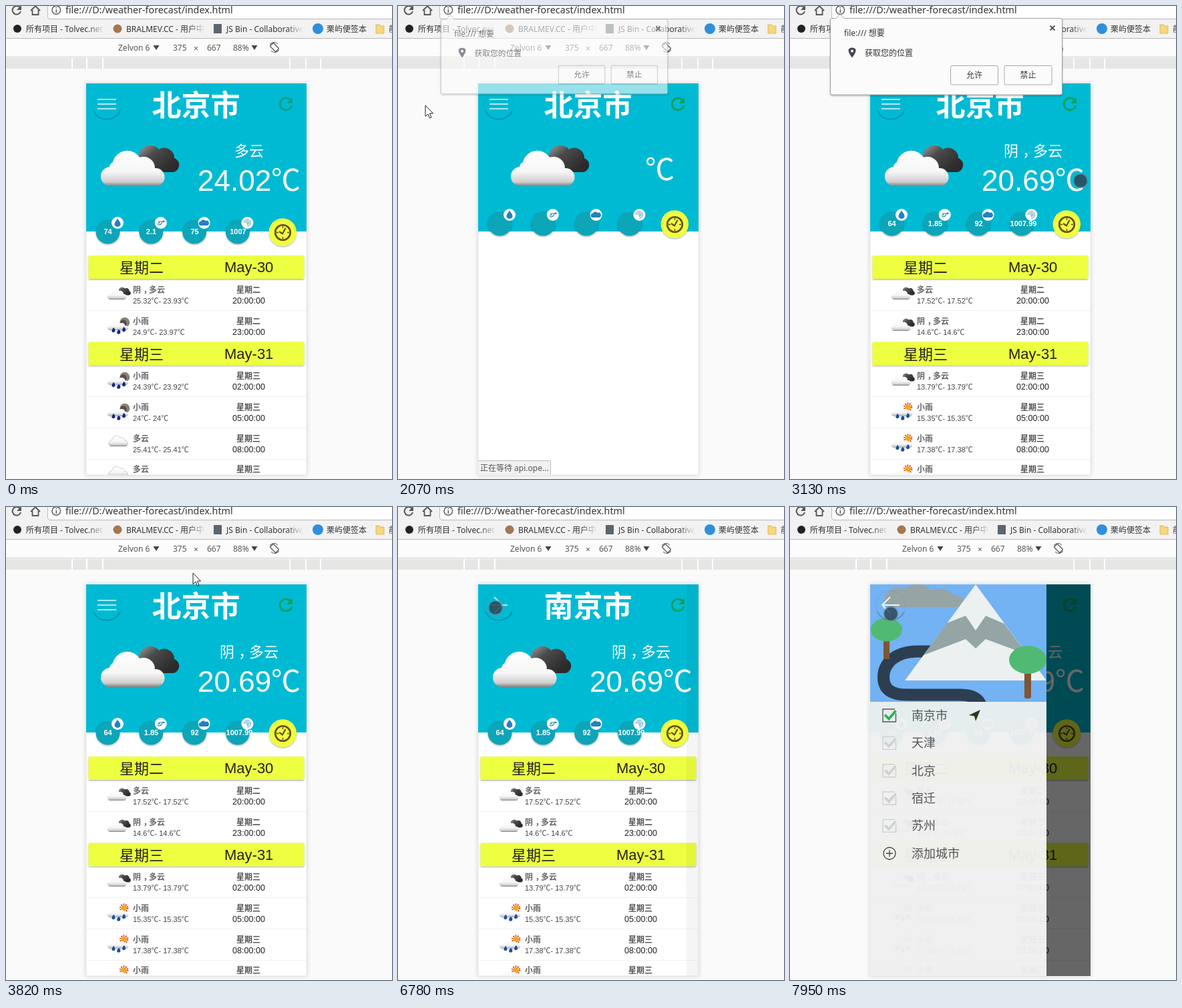
An HTML page that plays this animation: 578x709 px, repeating every 8000 ms.

```html
<!DOCTYPE html>
<html lang="zh-CN">
<head>
<meta charset="utf-8">
<title>Weather forecast</title>
<style>
html, body { margin: 0; width: 100%; height: 100%; overflow: hidden; background: #fafafa; }
svg { display: block; }
text { font-family: 'Noto Sans', 'Noto Sans CJK SC', 'Noto Sans CJK', sans-serif; white-space: pre; }
.cjk { font-family: 'Noto Sans CJK SC', 'Noto Sans CJK', sans-serif; }
.num { font-family: 'Liberation Sans', 'Noto Sans CJK SC', 'Noto Sans CJK', sans-serif; }
</style>
</head>
<body>
<svg id="stage" width="578" height="709" viewBox="0 0 578 709"></svg>
<script>
const LOOP = 8000;
const TEAL = '#00bad3', YELLOW = '#edff41';

const rect = (x, y, w, h, fill, more = '') =>
  `<rect x="${x}" y="${y}" width="${w}" height="${h}" fill="${fill}" ${more}/>`;
const disc = (x, y, r, fill, more = '') =>
  `<circle cx="${x}" cy="${y}" r="${r}" fill="${fill}" ${more}/>`;
const path = (d, fill, more = '') => `<path d="${d}" fill="${fill}" ${more}/>`;
const line = (d, color, width, more = '') =>
  `<path d="${d}" fill="none" stroke="${color}" stroke-width="${width}" ${more}/>`;
const text = (x, y, size, fill, str, cls = '', more = '') =>
  `<text x="${x}" y="${y}" font-size="${size}" fill="${fill}" class="${cls}" ${more}>${str}</text>`;
const group = (body, more = '') => `<g ${more}>${body}</g>`;
const MID = 'text-anchor="middle" ', BOLD = 'font-weight="700"';
const degrees = s => s.replace(/℃/g, '<tspan class="cjk">℃</tspan>');
// Sets the comma in the middle of its cell.
const comma = s => s.replace(/，(.)/, '<tspan dx=".28em">，</tspan><tspan dx="-.28em">$1</tspan>');

const defs = `<defs>
  <linearGradient id="white" gradientUnits="userSpaceOnUse" x1="0" y1="9" x2="0" y2="63">
    <stop offset="0" stop-color="#fff"/><stop offset=".6" stop-color="#f6f6f6"/>
    <stop offset=".88" stop-color="#cfcfcf"/><stop offset="1" stop-color="#808080"/>
  </linearGradient>
  <linearGradient id="dark" gradientUnits="userSpaceOnUse" x1="60" y1="0" x2="95" y2="42">
    <stop offset="0" stop-color="#999"/><stop offset=".4" stop-color="#4a4a4a"/>
    <stop offset="1" stop-color="#2b2b2b"/>
  </linearGradient>
  <linearGradient id="fade"><stop offset="0" stop-color="#f2f2f2" stop-opacity="0"/>
    <stop offset="1" stop-color="#f2f2f2"/></linearGradient>
  <filter id="low" x="-20%" y="-20%" width="140%" height="150%">
    <feDropShadow dx="0" dy="1.2" stdDeviation="1.3" flood-opacity=".34"/></filter>
  <filter id="soft" x="-10%" y="-10%" width="120%" height="120%">
    <feDropShadow dx="0" dy="0" stdDeviation="3" flood-opacity=".16"/></filter>
  <clipPath id="screen"><rect x="120" y="116" width="330" height="587"/></clipPath>
  <clipPath id="cover"><rect x="120" y="116" width="264" height="176"/></clipPath>
  <g id="cloud" fill="url(#white)">
    <path d="M15 63A14.500 14.500 0 0 1 12 34A9 9 0 0 1 17 27A22 22 0 0 1 57 20A17 17 0 0 1 80 36A13.500 13.500 0 0 1 82 63Z"/>
  </g>
  <g id="pair">
    <path d="M56 17A17 17 0 0 1 86 8A15 15 0 0 1 109 21A11 11 0 0 1 108 42H60Z" fill="url(#dark)"/>
    <use href="#cloud"/>
  </g>
  <g id="drops">${[[30, 48], [56, 57], [82, 45]].map(([x, y]) =>
    path(`M${x} ${y}q13 12 9 20a10 10 0 0 1 -19 0q-1 -7 10 -20z`, 'currentColor', 'stroke="#fff" stroke-width="2"')).join('')}</g>
  <g id="night">
    ${disc(86, 24, 25, '#8b8272')}${disc(79, 29, 17, '#55504a')}
    <use href="#cloud" transform="translate(0 12) scale(1.1 .8)"/><use href="#drops" color="#14248a"/>
  </g>
  <g id="sun">
    ${disc(82, 17, 18, 'none', 'stroke="#d9542c" stroke-width="9" stroke-dasharray="6 5.3"')}
    ${disc(82, 17, 14, '#f7a51c')}
    <use href="#cloud" transform="translate(0 12) scale(1.1 .8)"/><use href="#drops" color="#1a4c9c"/>
  </g>
</defs>`;

// Browser frame
const bookmark = (x, icon, label, end) =>
  icon + text(x, 39, 12, '#333', label) +
  (end ? rect(end - 24, 22, 24, 25, 'url(#fade)') + rect(end, 22, 12, 25, '#f2f2f2') : '');

const browser = rect(0, 0, 578, 709, '#fafafa') + rect(0, 0, 578, 48, '#f2f2f2') +
  path('M62.500 -2V16Q62.500 19.500 66 19.500H580V-2Z', '#fff', 'stroke="#b9b9b9"') +
  line('M21 2.500A6.300 6.300 0 1 0 22 8', '#555', 2) + path('M23 -1V6H16Z', '#555') +
  line('M37 7L44 0L51 7M39.500 6V13H48.500V6', '#555', 1.8) +
  line('M69 6a6.300 6.300 0 1 0 12.600 0a6.300 6.300 0 1 0 -12.600 0M75.300 5v5M75.300 2v1.600', '#555', 1.4) +
  text(89, 11, 14.3, '#333', 'file:///D:/weather-forecast/index.html') +
  bookmark(30, disc(17, 34, 6, '#222'), '所有项目 - Tolvec.net', 147) +
  bookmark(180, disc(167, 34, 6.5, '#a5764f'), 'BRALMEV.CC - 用户中心', 298) +
  bookmark(330, rect(311, 27, 12, 14, '#5a6670'), 'JS Bin - Collaborative', 445) +
  bookmark(480, disc(467, 34, 8, '#2e8fdc'), '栗屿便签本') +
  path('M554 28h5l2 2h5v11h-12z', '#f7d67c', 'stroke="#d9b04e" stroke-width=".8"') +
  text(573, 39, 12, '#333', '前') +
  rect(0, 48, 578, 1, '#b8b8b8') + rect(0, 49, 578, 27, '#fcfcfc') + rect(0, 76, 578, 1, '#cfcfcf') +
  text(168, 67, 12, '#555', 'Zelvon 6') + text(250, 67, 12, '#555', '375') +
  text(281, 68, 12, '#555', '×') + text(301, 67, 12, '#555', '667') + text(340, 67, 12, '#555', '88%') +
  path('M220.500 59h9l-4.500 7zM367.500 59h9l-4.500 7z', '#444') +
  group(rect(-3.5, -6, 7, 12, 'none', 'stroke="#555" stroke-width="1.300" rx="1"') +
    line('M-2 -7.500A7 7 0 0 1 7 0M2 7.500A7 7 0 0 1 -7 0', '#555', 1),
    'transform="translate(402 62) rotate(-45)"') +
  rect(0, 78, 578, 16, '#e6e6e4') +
  [98, 120, 144, 424, 448, 470].map(x => rect(x, 78, 2, 16, '#fff')).join('') +
  rect(120, 116, 330, 587, '#fff', 'filter="url(#soft)" stroke="#e4e4e4"');

// Weather page
const DAYS = ['二', '二', '三', '三', '三', '三'];
const HOURS = ['20', '23', '02', '05', '08', '11'];
const ROW_Y = [426, 473, 555, 602, 649, 695];
const ICON_POS = { pair: [152, -5], night: [152, -6], sun: [152, -6], cloud: [154, -8] };

const dayBar = (y, day, date) =>
  rect(123.5, y, 323, 35, YELLOW, 'rx="2" filter="url(#low)"') +
  text(170, y + 26, 22, '#222', day, 'cjk') + text(327, y + 25, 22, '#222', date, 'num');

const forecast = rows => dayBar(374, '星期二', 'May-30') + dayBar(503.5, '星期三', 'May-31') +
  [456, 585, 632, 679].map(y => rect(120, y, 330, 1, '#f0f0f0')).join('') +
  rows.map(([icon, desc, temps], i) => {
    const y = ROW_Y[i], [ix, iy] = ICON_POS[icon];
    return `<use href="#${icon}" transform="translate(${ix} ${y + iy}) scale(.3)" ${
        icon === 'cloud' ? 'stroke="#999" stroke-width="1.500"' : ''}/>` +
      text(190, y + 4, 12, '#666', comma(desc), 'cjk', BOLD) +
      text(190, y + 20, 11, '#444', degrees(temps), 'num') +
      text(363, y + 4, 12, '#555', '星期' + DAYS[i], 'cjk', MID + BOLD) +
      text(363.5, y + 20, 12.6, '#222', HOURS[i] + ':00:00', 'num', MID);
  }).join('');

const current = (desc, temp) =>
  `<use href="#pair" x="143" y="207"/>` +
  text(364, 225, 22, '#fff', comma(desc), 'cjk', MID + 'font-weight="500"') +
  text(287, 277, 44, '#fff', degrees(temp + '℃'), 'num');

const values = list => list.map((v, i) =>
  text(152.5 + i * 65 + (v.length > 5 ? 2 : 0), 342, 11, '#fff', v, 'num', MID + BOLD)).join('');

const before = {
  now: current('多云', '24.02'), vals: values(['74', '2.1', '75', '1007']),
  list: forecast([
    ['pair', '阴，多云', '25.32℃- 23.93℃'], ['night', '小雨', '24.9℃- 23.97℃'],
    ['night', '小雨', '24.39℃- 23.92℃'], ['night', '小雨', '24℃- 24℃'],
    ['cloud', '多云', '25.41℃- 25.41℃'], ['cloud', '多云', '25.41℃- 25.41℃']])
};
const after = {
  now: current('阴，多云', '20.69'), vals: values(['64', '1.85', '92', '1007.99']),
  list: forecast([
    ['pair', '多云', '17.52℃- 17.52℃'], ['pair', '阴，多云', '14.6℃- 14.6℃'],
    ['pair', '阴，多云', '13.79℃- 13.79℃'], ['sun', '小雨', '15.35℃- 15.35℃'],
    ['sun', '小雨', '17.38℃- 17.38℃'], ['sun', '小雨', '17.38℃- 17.38℃']])
};
const empty = `<use href="#pair" x="170" y="207"/>` + text(370, 261, 44, '#fff', '℃', 'cjk');

const BLUE = '#2580bd';
const badgeIcons = [
  path('M0 -6Q9 4 0 6Q-9 4 0 -6Z', BLUE),
  line('M-5 2.500Q0 4 1.500 0T5 -2.500T1 -2T-2 0M-5 0.500L-1 0', BLUE, 1.1),
  path('M-5 4A3 3 0 0 1 -5 -2A4 4 0 0 1 2 -3A3.600 3.600 0 0 1 5 4Z', BLUE),
  line('M-5 0A5 5 0 1 1 0 5M-2.500 0A2.500 2.500 0 1 1 0 2.500M0 -1V2', BLUE, 0.9)
];
const badges = badgeIcons.map((icon, i) => {
  const x = 152.5 + i * 64.8;
  return disc(x, 338.5, 18, '#08a5b8', 'filter="url(#low)"') +
    group(disc(0, 0, 9, '#fff') + icon, `transform="translate(${x + 14.5} 325)"`);
}).join('') +
  disc(414.3, 339, 20.8, YELLOW, 'filter="url(#low)"') +
  disc(414.5, 339.5, 11.3, 'none', 'stroke="#6a4a12" stroke-width="2.600"') +
  line('M414.500 330v3M414.500 346v3M405 339.500h3M421 339.500h3', '#6a4a12', 1.4) +
  line('M409 338L414 341.500L418.500 333', '#6a4a12', 2.2);

const layers = (key, extra = '') =>
  group(before[key], 'data-s="before"') + group(after[key], 'data-s="after"') + extra;

const page = group(
  rect(120, 116, 330, 222, TEAL) +
  text(284.5, 165, 44, '#fff', '北京市', 'cjk', `id="city" ${MID} ${BOLD}`) +
  group(line('M426 141A9 9 0 1 0 428 149', 'currentColor', 2.8) +
    path('M429 137V146H420Z', 'currentColor'), 'id="reload"') +
  layers('now', group(empty, 'data-s="empty"')) + layers('list') +
  group(badges + layers('vals'), 'id="badges"') +
  group(rect(119.5, 681.5, 109, 23, '#f1f1f1', 'stroke="#bdbdbd" rx="2"') +
    text(123, 697, 12, '#555', '正在等待 api.ope...'), 'id="status"') +
  rect(432, 116, 18, 587, '#000', 'id="strip" opacity="0"') +
  rect(120, 116, 330, 587, '#000', 'id="scrim" opacity="0"'),
  'clip-path="url(#screen)"');

// Side drawer
const cover = group(
  rect(120, 116, 264, 176, '#73b2f3') +
  path('M150 150A12 12 0 0 1 147 128A17 14 0 0 1 172 123A25 20 0 0 1 212 125A24 18 0 0 1 245 132A17 14 0 0 1 262 150Z', '#95a5a6') +
  line('M225 216.500H190C157 217 140 235 140 255C140 275 154 281.500 175 281.500H255C274 281.500 285 288 287 302', '#2c3e50', 18) +
  path('M278 116L384 260H172Z', '#ecf0f1') +
  path('M200 222L235 174L263 163L278 185L293 163L321 175L355 221L293 198L278 212L263 198Z', '#95a5a6') +
  rect(140, 198, 9, 30, '#7e5634') + `<ellipse cx="144.500" cy="184" rx="23.500" ry="17.500" fill="#51ba72"/>` +
  rect(351, 245, 10, 42, '#7e5634', 'rx="3"') + `<ellipse cx="356" cy="229" rx="28" ry="21" fill="#51ba72"/>`,
  'clip-path="url(#cover)"');

const cities = ['南京市', '天津', '北京', '宿迁', '苏州', '添加城市'];
const drawer = group(
  rect(120, 292, 264, 411, '#fff', 'opacity=".9"') + cover +
  cities.map((name, i) => {
    const y = 312.5 + i * 41.35;
    const label = text(182, y + 6.5, 18, '#555', name, 'cjk');
    if (i === 5) return label +
      disc(149, y, 9, 'none', 'stroke="#444" stroke-width="1.300"') +
      line(`M144 ${y}h10M149 ${y - 5}v10`, '#444', 1.3);
    const [box, tick] = i ? ['#ccd0d0', '#cdd2d2'] : ['#555', '#27b24a'];
    return label + line(`M157 ${y - 9.5}H139V${y + 9.5}H158.500V${y - 3}`, box, 1.4) +
      line(`M142 ${y - 1}l6 6l10.500 -12`, tick, 3.6);
  }).join('') + path('M285 304L278 321L276 313.500L268 312Z', '#33351f'),
  'id="drawer"');

const menu = group(
  disc(151, 148, 22, 'none', 'stroke="#000" stroke-opacity=".04" stroke-width="1.500"') +
  line('M131 157A22 22 0 0 0 171 157', '#000', 2, 'opacity=".15"') +
  `<path id="bars" fill="none" stroke="#fff" stroke-width="2"/>`);

// Permission prompt
const button = (x, label) =>
  rect(x, 89.5, 71, 28.5, '#fbfbfb', 'stroke="#a9a9a9" rx="2"') +
  text(x + 35.5, 108, 12, '#333', label, 'cjk', MID);
const prompt = group(
  path('M62.500 18.500H69L75 12.500L81 18.500H405Q407.500 18.500 407.500 21V130.500Q407.500 133 405 133H63Q60.500 133 60.500 130.500V21Q60.500 18.500 63 18.500Z',
    '#fbfbfb', 'stroke="#a5a5a5" filter="url(#low)"') +
  text(81, 45, 12, '#333', 'file:/// 想要') +
  line('M389.500 29.500l7 7m0 -7l-7 7', '#555', 2) +
  path('M93 77.500Q82 63 93 62.500Q104 63 93 77.500Z', '#4c4355') + disc(93, 67.5, 2, '#fff') +
  text(112, 75, 12, '#333', '获取您的位置', 'cjk') + button(240.5, '允许') + button(321, '禁止'),
  'id="prompt"');

const pointer =
  path('M0 0V16.500L4 13L6.500 19L9 18L6.500 12H11.500Z', '#fff', 'id="arrow" stroke="#222" stroke-linejoin="round"') +
  disc(0, 0, 10.5, '#2c4250', 'id="touch" stroke="#5f8aa0" stroke-width="1.500"');

const stage = document.getElementById('stage');
stage.innerHTML = defs + browser + page +
  group(drawer, 'clip-path="url(#screen)"') + menu + prompt + pointer;

const $ = id => document.getElementById(id);
const set = (id, name, value) => $(id).setAttribute(name, value);
const show = (node, on) => node.setAttribute('visibility', on ? 'visible' : 'hidden');
const span = (t, a, b) => Math.min(1, Math.max(0, (t - a) / (b - a)));

// time, x, y
const TRACK = [
  [0, 461, 714], [70, 461, 709], [500, 100, 273], [670, 100, 273], [980, 16, 12], [1500, 16, 12],
  [1990, 41, 149], [2650, 41, 149], [3060, 435, 262], [3130, 435, 262], [3400, 250, 104],
  [3520, 280, 99], [4590, 280, 99], [4830, 284, 153], [5150, 284, 153], [5420, 215, 132],
  [5690, 146, 151], [7949, 146, 151], [7950, 151, 160], [LOOP, 151, 160]
];
function pointerAt(t) {
  const i = Math.max(1, TRACK.findIndex(k => k[0] > t));
  const [a, b] = [TRACK[i - 1], TRACK[i]];
  const u = span(t, a[0], b[0]), e = u * u * (3 - 2 * u);
  return [a[1] + (b[1] - a[1]) * e, a[2] + (b[2] - a[2]) * e];
}

function draw(t) {
  const state = t < 1520 ? 'before' : t < 2290 ? 'empty' : 'after';
  stage.querySelectorAll('[data-s]').forEach(g => show(g, g.dataset.s === state));
  show($('status'), state === 'empty');
  $('city').textContent = t < 4660 ? '北京市' : '南京市';
  set('reload', 'color', state === 'before' ? '#0fa184' : '#10a05c');
  set('badges', 'transform', `translate(0 ${t >= 1520 && t < 3740 ? -12 : 0})`);

  const shown = t < 3000 ? span(t, 1940, 2190) : 1 - span(t, 3670, 3820);
  const scale = 0.955 + 0.045 * shown;
  show($('prompt'), shown > 0);
  set('prompt', 'opacity', Math.min(1, shown * 1.15));
  set('prompt', 'transform', `translate(234 75) scale(${scale}) translate(-234 -75)`);

  const open = span(t, 6850, 7090), ease = 1 - (1 - open) ** 3;
  show($('drawer'), open > 0);
  set('drawer', 'transform', `translate(${-264 * (1 - ease)} 0)`);
  set('scrim', 'opacity', 0.6 * ease);
  set('strip', 'opacity', t >= 6780 && open === 0 ? 0.04 : 0);

  const tip = 156 + 8 * ease;
  set('bars', 'd', t < 6780
    ? 'M137 140H165M137 147H165M137 154H165'
    : `M138 147H164M${tip - 12} 135L${tip} 147L${tip - 12} 159`);
  set('bars', 'transform', `rotate(${-180 * ease} 151 147)`);
  set('bars', 'opacity', 0.68 + 0.2 * ease);

  const [x, y] = pointerAt(t);
  const inside = x > 120 && x < 450 && y > 116 && y < 703;
  show($('arrow'), !inside);
  show($('touch'), inside);
  set('arrow', 'transform', `translate(${x} ${y})`);
  set('touch', 'transform', `translate(${x} ${y})`);
  set('touch', 'opacity', t >= 6010 && t < 6080 ? 0.95 : 0.82);
}

const start = performance.now();
function tick() {
  draw((performance.now() - start) % LOOP);
  requestAnimationFrame(tick);
}
tick();
</script>
</body>
</html>
```
